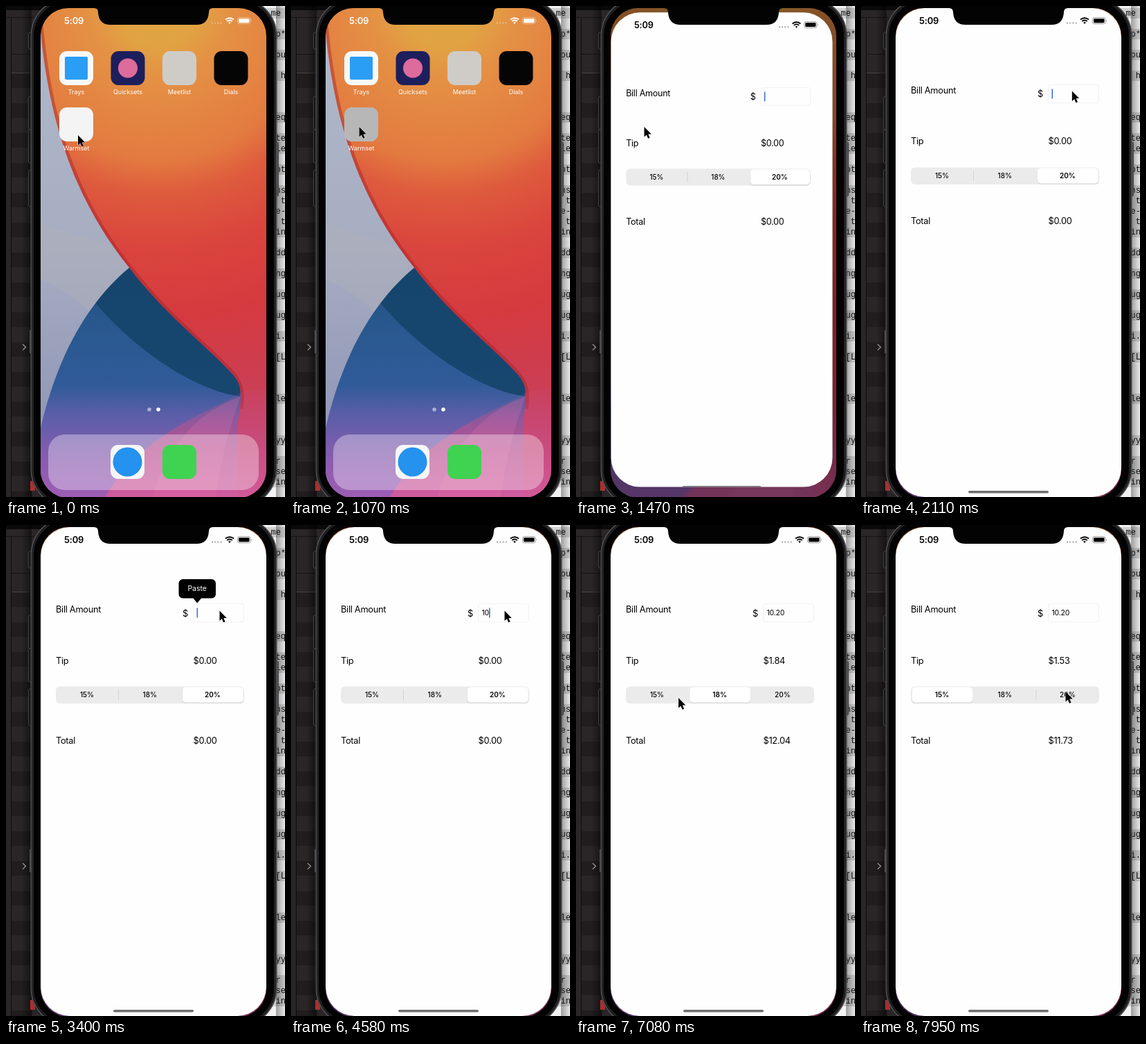
Write an HTML page that moves like this. It is 403x707 px and loops after 8 s.

```html
<!DOCTYPE html>
<html lang="en">
<head>
<meta charset="utf-8">
<title>Tip calculator</title>
<style>
  html, body { margin: 0; width: 100%; height: 100%; overflow: hidden; background: #262223; }
  svg { display: block; width: 100vw; height: 100vh; }
  text { font-family: Inter, sans-serif; white-space: pre; }
  .label { font-size: 12.8px; letter-spacing: -.28px; }
  .time { font-size: 13px; font-weight: 600; letter-spacing: -.2px; }
  .mono { font: 12px "Liberation Mono", monospace; fill: #111; }
  .app { font-size: 9px; fill: #fff; text-anchor: middle; }
  .seg { font-size: 10px; text-anchor: middle; }
</style>
</head>
<body>
<svg viewBox="0 0 403 707">
  <defs>
    <radialGradient id="sunset" gradientUnits="userSpaceOnUse" cx="220" cy="0" r="600">
      <stop offset="0" stop-color="#dea640"/><stop offset=".1" stop-color="#e1a243"/>
      <stop offset=".17" stop-color="#e49144"/><stop offset=".37" stop-color="#e37a40"/>
      <stop offset=".45" stop-color="#de5b3d"/><stop offset=".58" stop-color="#da453d"/>
      <stop offset=".75" stop-color="#d53a3f"/><stop offset="1" stop-color="#c8405a"/>
    </radialGradient>
    <linearGradient id="mist" x2="0" y2="1">
      <stop offset="0" stop-color="#b0bacd"/><stop offset=".5" stop-color="#a7adc1"/><stop offset="1" stop-color="#868db2"/>
    </linearGradient>
    <linearGradient id="sea" x2="0" y2="1">
      <stop offset="0" stop-color="#1d4f7e"/><stop offset=".2" stop-color="#28578c"/>
      <stop offset=".48" stop-color="#305b99"/><stop offset=".6" stop-color="#5b5ea8"/>
      <stop offset=".8" stop-color="#8d5cb0"/><stop offset="1" stop-color="#a45db6"/>
    </linearGradient>
    <linearGradient id="rose" x2="0" y2="1">
      <stop offset="0" stop-color="#c8508a" stop-opacity="0"/><stop offset=".5" stop-color="#c8508a" stop-opacity=".75"/>
      <stop offset="1" stop-color="#d660a4"/>
    </linearGradient>
    <linearGradient id="shadeLeft">
      <stop offset="0" stop-opacity="0"/><stop offset="1" stop-opacity=".5"/>
    </linearGradient>
    <linearGradient id="shadeRight">
      <stop offset="0" stop-opacity=".35"/><stop offset="1" stop-opacity=".04"/>
    </linearGradient>
    <clipPath id="screenClip"><rect x="50" y="3" width="326" height="705" rx="40"/></clipPath>
    <clipPath id="cardClip"><rect id="cardShape"/></clipPath>
    <g id="status">
      <text class="time" x="84" y="26">5:09</text>
      <path d="M297 24.5h15" stroke="currentColor" stroke-width="2" stroke-dasharray="2 2.2" opacity=".35"/>
      <path d="M317 19.6q6 -4.6 12 0M319.2 22q3.8 -3 7.6 0" fill="none" stroke="currentColor" stroke-width="1.9"/>
      <path d="M321.2 23.7q1.800 -1.2 3.6 0l-1.8 2.2z"/>
      <rect x="334.5" y="16.7" width="18.5" height="9" rx="2.6" fill="none" stroke="currentColor" stroke-opacity=".4"/>
      <rect x="336" y="18.2" width="15.5" height="6" rx="1.4"/>
      <path d="M354.3 19.7q1.5 1.5 0 3z" opacity=".5"/>
    </g>
  </defs>

  <g id="desktop"></g>

  <g id="phone">
    <g fill="#151415" stroke="#454345">
      <rect x="32.5" y="38" width="6" height="24" rx="2"/>
      <rect x="32.5" y="130" width="6" height="48" rx="2"/>
      <rect x="32.5" y="178" width="6" height="48" rx="2"/>
      <rect x="32.5" y="236" width="6" height="53" rx="2"/>
      <rect x="387" y="196" width="6.5" height="78" rx="2" fill="#555"/>
    </g>
    <rect x="36.5" y="-11" width="354" height="732" rx="54" fill="#030303" stroke="#4b4a4d" stroke-width="2"/>
    <rect x="39" y="-8" width="349" height="726" rx="51" fill="none" stroke="#242325" stroke-width="2"/>
  </g>

  <g clip-path="url(#screenClip)">
    <g id="wall">
      <path d="M0 -40H430V760H0Z" fill="url(#sunset)"/>
      <path d="M46 -20C54 160 100 280 178 377C230 445 290 490 325 528Q344 548 338 580" fill="none" stroke="#a31f2a" stroke-opacity=".45" stroke-width="9"/>
      <path d="M20 -20H46C54 160 100 280 178 377L200 720H20Z" fill="url(#mist)"/>
      <path d="M20 300Q80 325 152 345L178 377L120 440Q80 400 20 385Z" fill="#b0afb7" opacity=".4"/>
      <path d="M178 377C230 445 290 490 325 528C345 548 339 570 335 600V730H20V730L50 608C75 500 120 425 178 377Z" fill="url(#sea)"/>
      <path d="M178 377C230 445 290 490 325 528Q341 544 338 562C280 556 190 500 129.5 428C144.4 408 160.6 391.4 178 377Z" fill="#15446b" opacity=".9"/>
      <path d="M339 556C300 585 190 610 130 730H430V540Z" fill="url(#rose)"/>
      <path d="M339 562Q235 600 205 730H300Q310 640 339 562Z" fill="#e272a8" opacity=".25"/>
    </g>
    <g id="icons"></g>
    <use href="#status" fill="#fff" color="#fff"/>
    <rect id="dim" x="50" y="0" width="326" height="710"/>

    <g id="card" clip-path="url(#cardClip)">
      <rect width="403" height="710" fill="#fefefe"/>
      <g id="content">
        <use href="#status" fill="#000" color="#000"/>
        <text class="label" x="72" y="126">Bill Amount</text>
        <text class="label" x="72" y="199.5">Tip</text>
        <text class="label" x="72" y="314.5">Total</text>
        <text class="label" x="255" y="131.5">$</text>
        <text class="label" id="tip" x="270.5" y="199.5"></text>
        <text class="label" id="total" x="270.5" y="314.5"></text>
        <g id="chrome">
          <rect x="270.5" y="113.5" width="73" height="26" rx="3" fill="none" stroke="#f1f1f1"/>
          <rect x="72" y="232.5" width="272" height="24.5" rx="6" fill="#ebebec"/>
          <path id="dividerLeft" d="M162.5 237v15" stroke="#d4d4d6"/>
          <path id="dividerRight" d="M253 237v15" stroke="#d4d4d6"/>
          <g id="knob">
            <rect x="73" y="234" width="89" height="23" rx="5.5" fill="#d9d9db"/>
            <rect x="73.5" y="233.5" width="88" height="22" rx="5" fill="#fff"/>
          </g>
        </g>
        <g id="options"></g>
        <text id="amount" x="275.5" y="130.3" font-size="10.5" letter-spacing="-.2"></text>
        <rect id="caret" y="119.5" width="1.6" height="14" fill="#3d6bea"/>
        <g id="paste">
          <path d="M255.5 78H297a6 6 0 0 1 6 6V99.5a6 6 0 0 1-6 6H282L276.2 112.5L270.5 105.5H255.5a6 6 0 0 1-6-6V84a6 6 0 0 1 6-6Z"/>
          <text x="276.2" y="95.3" font-size="10.5" fill="#fff" text-anchor="middle">Paste</text>
        </g>
        <rect x="155" y="698" width="116" height="3.6" rx="1.8" fill="#6f6f71"/>
      </g>
    </g>
  </g>

  <path d="M127 0V3Q133 3 133 9Q134 27 151 27H275Q292 27 293 9Q293 3 299 3V0Z" fill="#030303"/>
  <path id="pointer" d="M0 0V14.5L3.3 11.4L5.6 16.8L8.1 15.8L5.8 10.5H10.3Z" stroke="#fff" stroke-width="1" paint-order="stroke"/>
</svg>

<script>
const LOOP = 8000;
const $ = id => document.getElementById(id);
const clamp = v => Math.min(1, Math.max(0, v));
const ramp = (t, from, to) => clamp((t - from) / (to - from));
const ease = u => u * u * (3 - 2 * u);
const mix = (a, b, u) => a + (b - a) * u;
const set = (id, attrs) => {
  for (const name in attrs) $(id).setAttribute(name, attrs[name]);
};
const rect = (x, y, w, h, fill, rx = 0) =>
  `<rect x="${x}" y="${y}" width="${w}" height="${h}" rx="${rx}" fill="${fill}"/>`;

function buildDesktop() {
  let art = rect(0, 0, 60, 707, '#2a2627');
  for (let y = 97; y < 707; y += 43) art += rect(8, y, 30, 21, '#211d1e');
  art += rect(0, 0, 60, 6, '#0b0a0b') + rect(0, 16, 40, 1, '#151314')
       + rect(8, 69, 30, 1, '#151314') + rect(8, 96, 30, 1, '#4a4143')
       + rect(7, 17, 1, 690, '#0c0b0c')
       + rect(22, 0, 15, 707, 'url(#shadeLeft)')
       + rect(34, 467, 2, 33, '#4c4a50') + rect(35, 684, 7, 14, '#a8302f')
       + '<path d="M24 487l4.5 4.3l-4.5 4.3" fill="none" stroke="#9a9698" stroke-width="1.3"/>';
  const lines = 'me||p*||ou|| h||||eq||te|le||pt||ns| t|e-| t|in||dd||ng||ug||ug||i.||[L||||le||||yy||r|se|in'.split('|');
  art += rect(370, 0, 33, 707, '#f2f2f2');
  lines.forEach((line, i) => {
    if (line) art += rect(370, i * 15 + 3, 33, 15, '#cfcfcf');
  });
  art += rect(390, 0, 13, 707, 'url(#shadeRight)');
  lines.forEach((line, i) => {
    art += `<text class="mono" x="${i ? 389.5 : 382.5}" y="${i * 15 + 14}">${line}</text>`;
  });
  $('desktop').innerHTML = art;
}

function buildIcons() {
  const tile = (x, y, fill) => rect(x, y, 49, 49, fill, 11);
  const name = (x, y, text) => `<text class="app" x="${x + 24.5}" y="${y + 61.5}">${text}</text>`;
  const disc = (x, y, r, fill) => `<circle cx="${x}" cy="${y}" r="${r}" fill="${fill}"/>`;
  const apps = [
    [77, 65, '#f8f8f8', 'Trays'], [151.5, 65, '#1d1f5c', 'Quicksets'],
    [226, 65, '#cfccc7', 'Meetlist'], [300.5, 65, '#050505', 'Dials'],
    [77, 146, '#f4f4f4', 'Warmset']
  ];
  let art = rect(61, 617, 304, 80, 'rgba(255,255,255,.34)', 24);
  for (const [x, y, fill, text] of apps) art += tile(x, y, fill) + name(x, y, text);
  art += rect(85, 73, 33, 33, '#2a9df4', 2) + disc(176, 89.5, 14, '#dd6b9c')
       + tile(151, 632, '#f6f6f6') + disc(175.5, 656.5, 21, '#2492ee')
       + tile(226, 632, '#3fd351')
       + disc(207, 581, 2.8, 'rgba(255,255,255,.5)') + disc(220, 581, 2.8, '#fff')
       + '<rect id="press" x="77" y="146" width="49" height="49" rx="11"/>';
  $('icons').innerHTML = art;
  $('options').innerHTML = ['15%', '18%', '20%'].map((text, i) =>
    `<text class="seg" x="${117 + i * 90.7}" y="248">${text}</text>`).join('');
}

// Pointer stops: time, x, y
const route = [
  [60, 104, 186], [410, 98.5, 179], [590, 98.5, 179], [850, 98.5, 174], [1500, 98.5, 174],
  [2150, 307, 122], [2640, 307, 122], [2800, 308.5, 123.5], [5940, 308.5, 123.5], [6230, 185.5, 256.5],
  [6350, 185.5, 256.5], [6580, 206, 249], [6790, 206, 249], [7230, 127, 249], [7500, 127, 249], [7930, 295.5, 240]
];
function pointerAt(t) {
  const next = route.findIndex(stop => stop[0] > t);
  if (next === 0) return route[0].slice(1);
  if (next < 0) return route[route.length - 1].slice(1);
  const [a, b] = [route[next - 1], route[next]];
  const u = ease(ramp(t, a[0], b[0]));
  return [mix(a[1], b[1], u), mix(a[2], b[2], u)];
}

const keyTimes = [3760, 4580, 4990, 5230, 5410];
const PICK_18 = 6660, PICK_15 = 7490;

function caretOpacity(t) {
  const last = keyTimes.filter(k => k <= t).pop() || 2460;
  const phase = t < last ? 0 : (t - last) % 960;
  return 1 - ramp(phase, 530, 620) + ramp(phase, 820, 920);
}

// The card grows from the app icon on a critically damped spring.
function drawLaunch(t) {
  const s = Math.max(0, t - 1139) * .0172;
  const p = 1 - (1 + s) * Math.exp(-s);
  const w = mix(49, 326, p), h = mix(49, 704, p ** 1.42);
  const x = mix(101.5, 213, p) - w / 2, y = mix(170.5, 355, p) - h / 2;
  set('cardShape', { x, y, width: w, height: h, rx: mix(11, 42, clamp(p * 2)) });
  set('card', { visibility: p > 0 ? 'visible' : 'hidden', opacity: clamp(p * 6) });
  set('content', { transform: `translate(${x} ${y}) scale(${w / 326}) translate(-50 -3)`, opacity: clamp(p * 3) });
  set('chrome', { opacity: ramp(p, .6, .9) });

  const around = k => `translate(213 355) scale(${k}) translate(-213 -355)`;
  const blur = radius => p > .01 ? `blur(${p * radius}px)` : 'none';
  set('wall', { transform: around(1 + .08 * p) });
  set('icons', { transform: around(1 - .048 * p) });
  $('wall').style.filter = blur(3);
  $('icons').style.filter = blur(4.5);
  $('icons').style.opacity = 1 - .25 * p;
  set('dim', { opacity: .43 * p });
  set('press', { opacity: .25 * ramp(t, 590, 700) });
}

function drawForm(t) {
  const picked = t < PICK_18 ? 2 : t < PICK_15 ? 1 : 0;
  const slide = 2 - ease(ramp(t, PICK_18, PICK_18 + 300)) - ease(ramp(t, PICK_15, PICK_15 + 280));
  set('knob', { transform: `translate(${slide * 90.7} 0)` });
  set('dividerLeft', { opacity: picked === 2 ? 1 : 0 });
  set('dividerRight', { opacity: picked === 0 ? 1 : 0 });
  [...$('options').children].forEach((option, i) =>
    option.setAttribute('font-weight', i === picked ? 600 : 450));

  const bill = picked === 2 ? 0 : 10.2;
  const tip = bill * [.15, .18, .2][picked];
  $('tip').textContent = '$' + tip.toFixed(2);
  $('total').textContent = '$' + (bill + tip).toFixed(2);

  const typed = '10.20'.slice(0, keyTimes.filter(k => k <= t).length);
  $('amount').textContent = typed;
  const length = typed ? $('amount').getComputedTextLength() : 0;
  set('caret', { x: 275.5 + length, opacity: caretOpacity(t) });
  set('paste', { opacity: ramp(t, 2640, 2850) - ramp(t, 3750, 3930) });
}

function frame(now) {
  const t = now % LOOP;
  drawLaunch(t);
  drawForm(t);
  set('pointer', { transform: `translate(${pointerAt(t).join(' ')})` });
  requestAnimationFrame(frame);
}

buildDesktop();
buildIcons();
requestAnimationFrame(frame);
</script>
</body>
</html>
```
